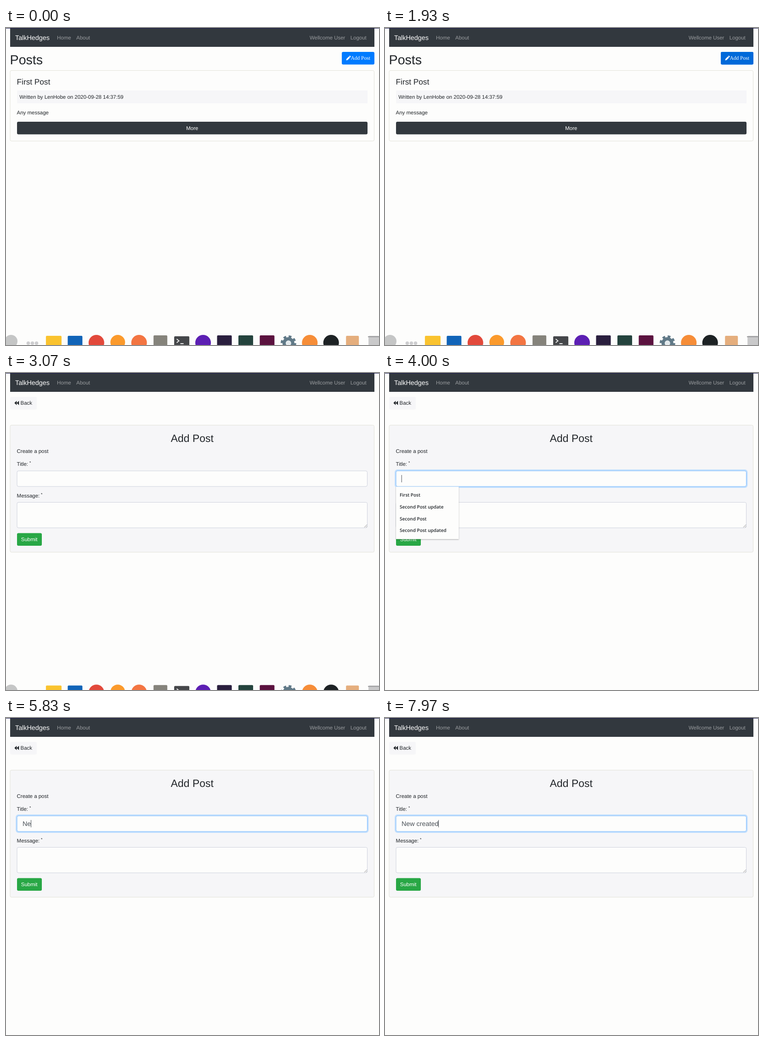
An HTML page for the animation above (8 s loop, 812x690 px).

```html
<!DOCTYPE html>
<html lang="en">
<head>
<meta charset="utf-8">
<title>Add a post</title>
<style>
  html, body { margin: 0; width: 100%; height: 100%; overflow: hidden; background: #fdfdfc; }
  svg { display: block; width: 812px; height: 690px; }
  text {
    font: 11.46px "Liberation Sans", Arial, sans-serif;
    fill: #212529;
    white-space: pre;
    text-rendering: geometricPrecision;
  }
  .brand { font-size: 14.32px; fill: #fff; }
  .link { fill: #999c9f; }
  .white { fill: #fff; }
  .h1 { font-size: 28.6px; }
  .h2 { font-size: 22.9px; }
  .h4 { font-size: 17.2px; }
  .sup { font-size: 8.6px; }
  .mid { text-anchor: middle; }
  .serif { font-family: "Liberation Serif", "Times New Roman", serif; fill: #fff; }
  .typed { font-size: 14.32px; fill: #495057; }
  .option { font: 600 10px "Open Sans", "Noto Sans", sans-serif; }
  .dark { fill: #32383e; }
  .light { fill: #f6f6f8; }
  .card { stroke: #e2e2d9; }
  .field { fill: #fdfdfc; stroke: #ced2dd; }
</style>
</head>
<body>
<svg viewBox="0 0 812 690">
  <defs>
    <filter id="shadow" x="-10%" y="-10%" width="120%" height="125%">
      <feDropShadow dx="0" dy="1" stdDeviation="1.2" flood-opacity=".4"/>
    </filter>
  </defs>
  <rect width="812" height="690" fill="#fdfdfc"/>
  <rect width="812" height="1" fill="#17174c"/>
  <rect class="dark" x="9" y="1" width="793" height="40"/>
  <text class="brand" x="20" y="25.5">TalkHedges</text>
  <text class="link" x="111" y="24.5">Home</text>
  <text class="link" x="153" y="24.5">About</text>
  <text class="link" x="661" y="24.5">Wellcome User</text>
  <text class="link" x="749.7" y="24.5">Logout</text>

  <g id="posts">
    <text class="h1" x="8.6" y="79">Posts</text>
    <rect x="731" y="52" width="71" height="27.5" rx="3" fill="#007bff"/>
    <rect id="hover" x="731" y="52" width="71" height="27.5" rx="3" fill="#0069d9"/>
    <path d="M740.5 70.5l.7-3.2 5.2-5.2 2.5 2.5-5.2 5.2zM747 61.5l1-1q.7-.5 1.3.1l1.1 1.1q.5.6 0 1.2l-1 1z" fill="#fff"/>
    <text class="serif" x="750.5" y="69.3">Add Post</text>
    <rect class="card" x="9" y="92.5" width="792.5" height="153.5" rx="3" fill="none"/>
    <text class="h4" x="23.6" y="123">First Post</text>
    <rect class="light" x="24" y="136" width="763" height="28"/>
    <text x="29.2" y="154">Written by LenHobe on 2020-09-28 14:37:59</text>
    <text x="23.6" y="188">Any message</text>
    <rect class="dark" x="24" y="204" width="763" height="27.5" rx="3"/>
    <text class="white mid" x="405.3" y="221.5">More</text>
  </g>

  <g id="form">
    <rect class="light" x="9" y="52" width="58" height="27.5" rx="3"/>
    <path d="M23.3 60.5v9.5l-5-4.7zM28.3 60.5v9.5l-5-4.7z" fill="#212529"/>
    <text x="31.6" y="69.3">Back</text>
    <rect class="light card" x="9" y="113.5" width="792.5" height="276.5" rx="3"/>
    <text class="h2 mid" x="405.3" y="150">Add Post</text>
    <text x="23.6" y="174">Create a post</text>
    <text x="23.6" y="202">Title:</text>
    <text class="sup" x="51" y="198">*</text>
    <text x="23.6" y="271">Message:</text>
    <text class="sup" x="76" y="267">*</text>
    <rect class="field" x="24" y="213" width="762.5" height="34" rx="3.5"/>
    <g id="focus">
      <rect x="22.4" y="211.4" width="765.7" height="37.2" rx="4.5" fill="none" stroke="#bfdefe" stroke-width="2.6"/>
      <rect x="24" y="213" width="762.5" height="34" rx="3.5" fill="#fdfdfc" stroke="#80bdff"/>
    </g>
    <text id="value" class="typed" x="36" y="235"></text>
    <rect id="caret" y="222" width="1" height="16" fill="#495057"/>
    <rect class="field" x="24" y="281.5" width="762.5" height="55.5" rx="3"/>
    <path d="M780 336l6-6M783.5 336l2.5-2.5" stroke="#777" stroke-width=".8"/>
    <rect x="24" y="348.5" width="54" height="27.5" rx="3" fill="#28a745"/>
    <text class="white" x="32.8" y="366">Submit</text>
    <g id="options">
      <rect x="24" y="247.5" width="136.5" height="114" fill="#fdfdfc" filter="url(#shadow)"/>
    </g>
  </g>

  <g id="dock"></g>
</svg>
<script>
const LOOP = 8000;
const HOVER = 1770, PAGE = 2700, HIDE = 3030, FOCUS = 3630, LIST = 3770;
const BLINK = 600;
const KEYS = [
  [5030, "N"], [5300, "e"], [6000, "w"], [6100, " "], [6230, "c"], [6570, "r"],
  [6770, "e"], [6930, "a"], [7130, "t"], [7300, "e"], [7870, "d"]
];

const $ = id => document.getElementById(id);
const show = (id, on) => { $(id).style.display = on ? "" : "none"; };
const ramp = (t, start, length) => Math.min(1, Math.max(0, (t - start) / length));

function add(parent, tag, attrs, content = "") {
  const el = document.createElementNS("http://www.w3.org/2000/svg", tag);
  for (const key in attrs) el.setAttribute(key, attrs[key]);
  el.textContent = content;
  $(parent).append(el);
}

["First Post", "Second Post update", "Second Post", "Second Post updated"].forEach(
  (label, i) => add("options", "text", { class: "option", x: 32, y: 269.3 + i * 25.7 }, label));

// Dock icons, evenly spaced along the bottom edge
const slot = i => 11 + i * 46.45;
const disc = (i, fill, r = 17) => add("dock", "circle", { cx: slot(i), cy: 668 + r, r, fill });
const tile = (i, fill, w = 33, y = 669) =>
  add("dock", "rect", { x: slot(i) - w / 2, y, width: w, height: 32, rx: 2, fill });

disc(0, "#c5c6c6", 14);
for (const dx of [-9, 0, 9]) add("dock", "circle", { cx: slot(1) + dx, cy: 686, r: 3.8, fill: "#cdcdcf" });
tile(2, "#fac32f", 34, 670);
tile(3, "#1164b8", 32, 670);
disc(4, "#e2493b");
disc(5, "#fb9a2c", 16);
disc(6, "#f37542");
tile(7, "#85837b", 30);
tile(8, "#45474a", 33, 671);
add("dock", "path", {
  d: `M${slot(8) - 11} 677l5 4-5 4M${slot(8) - 3} 687h7`,
  fill: "none", stroke: "#eee", "stroke-width": 1.8
});
disc(9, "#5c1fb3");
tile(10, "#2a1f3e", 32);
tile(11, "#24433d", 32);
tile(12, "#5b123f", 32);
add("dock", "circle", { cx: slot(13), cy: 686, r: 14.5, fill: "none", stroke: "#607987", "stroke-width": 5, "stroke-dasharray": "6 5.39" });
add("dock", "circle", { cx: slot(13), cy: 686, r: 9.5, fill: "#e4eaed", stroke: "#607987", "stroke-width": 7 });
disc(14, "#f68d38");
disc(15, "#1d2224");
tile(16, "#e5ae7d", 28, 670);
tile(17, "#c9c9ca", 23, 670);
add("dock", "path", { d: "M788 672h24", stroke: "#9c9c9e", "stroke-width": 2 });

function render(t) {
  show("posts", t < PAGE);
  show("form", t >= PAGE);
  $("hover").style.opacity = ramp(t, HOVER, 150);
  $("focus").style.opacity = ramp(t, FOCUS, 150);
  show("options", t >= LIST && t < KEYS[0][0]);

  const left = 1 - ramp(t, HIDE, 300);
  $("dock").setAttribute("transform", `translate(0 ${40 * (1 - left * left)})`);

  const pressed = KEYS.filter(([time]) => time <= t);
  const value = $("value");
  value.textContent = pressed.map(([, key]) => key).join("");
  const lastInput = pressed.length ? pressed[pressed.length - 1][0] : FOCUS;
  show("caret", t >= FOCUS && Math.floor((t - lastInput) / BLINK) % 2 === 0);
  const width = pressed.length && t >= PAGE ? value.getComputedTextLength() : 0;
  $("caret").setAttribute("x", 35.7 + width);
}

const start = performance.now();
function tick() {
  render((performance.now() - start) % LOOP);
  requestAnimationFrame(tick);
}
tick();
</script>
</body>
</html>
```
